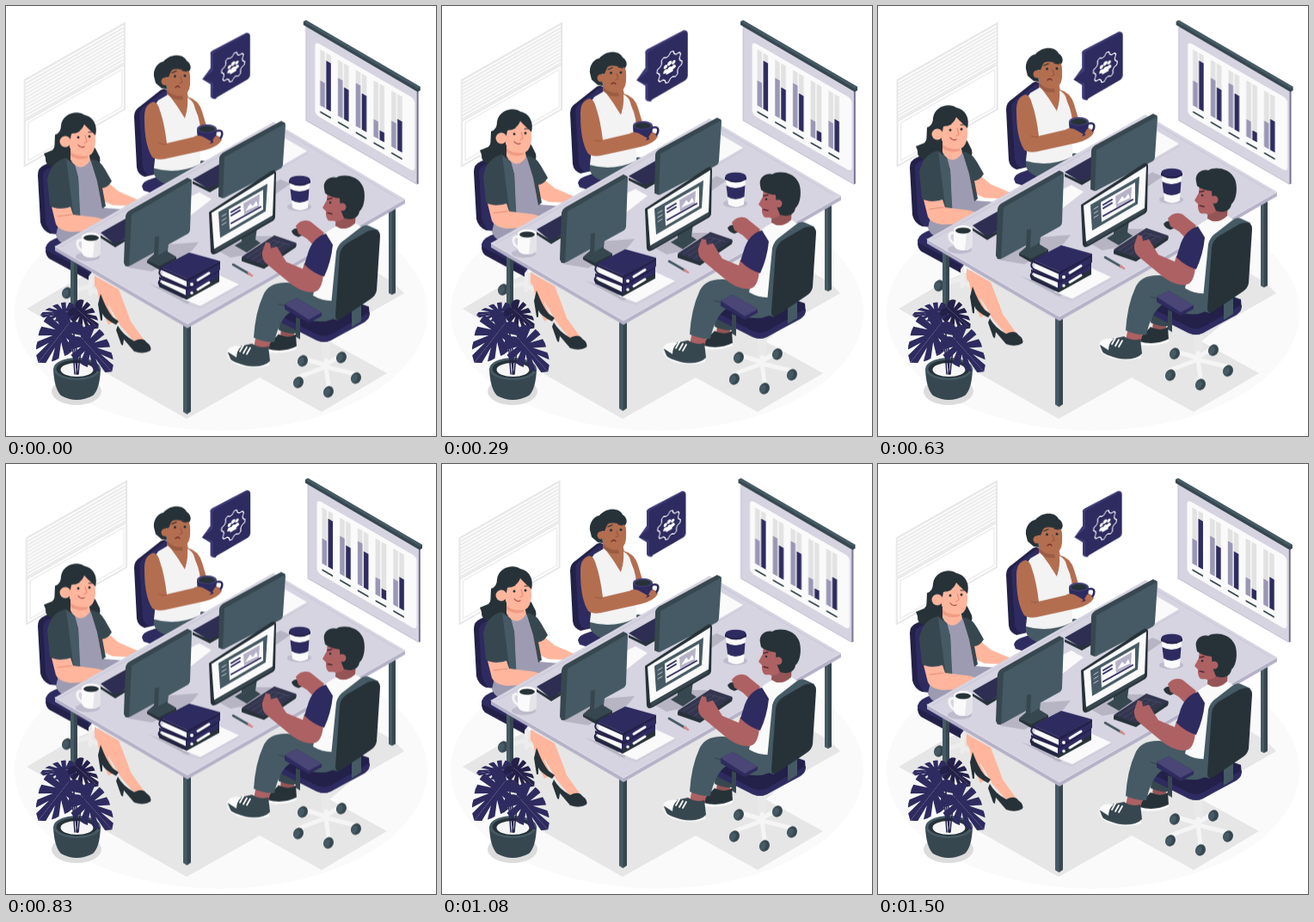
An HTML page that plays this animation: 500 px wide and 500 px high, repeating every 1.54 s.

```html
<!DOCTYPE html>
<html lang="en">
<head>
<meta charset="utf-8">
<title>Office</title>
<style>
html,body{margin:0;width:100%;height:100%;overflow:hidden;background:#fff}
svg{display:block;width:100vw;height:100vh}
.float,.shake,.beat{animation:1.54s linear infinite}
.float{animation-name:float}
.shake{animation-name:shake}
.beat{animation-name:beat;transform-origin:257px 71px}
@keyframes float{
  0%,100%{transform:translateY(-.4px)}
  46.6%{transform:translateY(-10px)}
  95.3%{transform:none}
}
@keyframes shake{
  0%,100%{transform:translateX(-.2px)}
  7.7%,85.6%{transform:translateX(-1px)}
  17.4%,75.8%{transform:translateX(2px)}
  27.1%,46.6%,66.1%{transform:translateX(-4px)}
  36.9%,56.4%{transform:translateX(4px)}
  95.3%{transform:none}
}
@keyframes beat{
  0%,100%{transform:scale(1.01)}
  17.4%,46.6%{transform:scale(1.1)}
  27.1%,36.9%,56.4%,95.3%{transform:none}
}
.navy{fill:#2e2b60}.deep{fill:#232049}.ink{fill:#263238}.slate{fill:#455a64}.dark{fill:#37474f}
.white{fill:#fafafa}.rose{fill:#ffb69d}.tan{fill:#b36e50}.brown{fill:#955455}.arm{fill:#ad6163}.lilac{fill:#d6d4e1}
.line{fill:none;stroke-linecap:round;stroke-linejoin:round}
</style>
</head>
<body>
<svg viewBox="0 0 500 500">
<defs>
  <pattern id="slats" width="10" height="4.1" patternUnits="userSpaceOnUse">
    <path d="M0 .6H10" stroke="#dedede" stroke-width="1"/>
  </pattern>
  <path id="half" d="M0 0C-6-9-22-9-26 2L-9 9-28 8Q-29 13-28 17L-9 16-26 23Q-25 29-22 33L-7 23-18 39Q-16 44-13 47L-5 32-8 52 0 57Z"/>
  <g id="leaf"><use href="#half"/><use href="#half" transform="scale(-1 1)"/></g>
  <g id="caster"><ellipse class="dark" rx="5.8" ry="6.800" transform="rotate(25)"/><ellipse class="slate" cx="-1.6" cy="1" rx="3.4" ry="5" transform="rotate(25)"/></g>
</defs>

<ellipse cx="250" cy="356" rx="240" ry="138" fill="#fafafa"/>
<path d="M24 352 78 320 290 230 450 321 463 334 400 370 376 390 443 427 367 472 295 432 210 480 110 423 62 374Z" fill="#e6e6e6"/>

<g class="shake">
  <g transform="translate(22 86) skewY(-29.6)">
    <path d="M0 0H116V100H0Z" fill="#fff" stroke="#e6e6e6" stroke-width="2"/>
    <path d="M4 52H113V96H4Z" fill="#fff" stroke="#ececec" stroke-width="1.4"/>
    <path d="M1 1H115V47H1Z" fill="#fafafa"/>
    <path d="M1 1H115V47H1Z" fill="url(#slats)"/>
    <path d="M1 48H115" stroke="#e0e0e0" stroke-width="1.4"/>
  </g>
</g>

<g class="shake">
  <path class="navy" d="M476 98 479.500 99V207L476 206Z"/>
  <g transform="translate(349 24) skewY(30)">
    <path class="lilac" d="M0 0H129V109H0Z" stroke="#b9b7cc" stroke-width=".8"/>
    <rect class="white" x="10.500" y="11" width="116" height="85" rx="5"/>
    <g id="bars"></g>
  </g>
  <path class="dark" d="M346 18 349 16.500 482 94V98L479 100 346 22Z"/>
  <path class="slate" d="M349 16.500 482 94 479 96 346 18.500Z"/>
</g>

<g class="beat">
  <path d="M238 57Q237 54 240 52L279 31.500Q282 31 283 33L244 108Q239 108 238 105V91L228.500 85 238 72Z" fill="#3d3a75"/>
  <path class="navy" d="M240.500 58Q240.500 55 243.500 53L280 33Q283.500 32 283.500 35V80Q283.500 83 281 85L245 106Q241 108 241 104V89L229 85 241 75Z"/>
  <g transform="translate(264 71) skewY(-30)">
    <path id="gear" class="line" stroke="#fff" stroke-width="1.1"/>
    <g fill="#fff" transform="scale(.9)"><circle cx="-4.800" cy="-3" r="2.200"/><circle cx="0" cy="-4.500" r="2.600"/><circle cx="4.800" cy="-3" r="2.200"/>
    <path d="M-7.500 4Q-7.500 0-4.500 0L-2.500 1Q0-2 2.500 1L4.500 0Q7.500 0 7.500 4L4 5V7H-4V5Z"/></g>
  </g>
</g>

<g class="float">
  <!-- colleague with cup -->
  <path class="deep" d="M149 129Q149 121 156 117L180 98Q186 95 191 102L200 180 174 196 161 199Q153 196 152 188Z"/>
  <path class="navy" d="M155 126Q156 120 162 116L184 99Q190 97 192 104L198 180 176 194 166 197Q160 194 159 187Z"/>
  <path class="navy" d="M158 210Q159 204 170 201L225 182 245 190 183 222 160 215Z"/>
  <path class="slate" d="M172 186Q200 190 228 180L238 182 190 209Q174 204 172 195Z"/>
  <path class="tan" d="M211 106Q224 109 228 123L234 143 223 146Z"/>
  <path class="tan" d="M187 90V104L196 124 208 132 213 112 210 98Z"/>
  <path d="M177 110 189 103Q199 116 208 131 212 119 211 107 218 110 220 120 227 135 226 152V184Q199 197 172 189 177 150 165 128Z" fill="#f3f3f3"/>
  <path class="tan" d="M171 112Q160 115 161 132 161 162 170 176 176 181 190 177L231 168Q247 164 251 156 247 149 238 151L221 152 187 160Q184 136 179 122 176 111 171 112Z"/>
  <path class="line" d="M186 161Q181 162 178 160" stroke="#985b42"/>
  <path fill="#9c5c43" d="M187 98Q194 106 205 105L206 109Q194 111 187 102Z"/>
  <path class="tan" d="M186 77Q197 69 211 70 215 78 214 92 213 104 203 105 192 104 187 94Z"/>
  <path class="ink" d="M172 82C171 73 177 66 183 65 190 56 206 55 210 64 215 67 216 73 213 76 204 75 196 71 192 76L189 83H186L187 97 181 96 174 90 172 82Z"/>
  <circle class="tan" cx="185" cy="88" r="4.500"/>
  <g class="line" stroke="#263238" stroke-width="1.300"><path d="M193 78 198 76M205 75 210 76"/><path d="M197 95Q200 92 202 95" stroke="#6e2f2c"/><path d="M203 83 205 89 202 90" stroke="#985b42"/></g>
  <circle class="ink" cx="196.500" cy="82" r="1.500"/><circle class="ink" cx="208" cy="81.500" r="1.500"/>
  <path class="line" d="M243 146Q253 143 251 151 249 157 242 155" stroke="#2e2b60" stroke-width="2.500"/>
  <path class="navy" d="M222 143H245Q245 158 239 160 231 162 226 159 222 155 222 143Z"/>
  <ellipse cx="233.500" cy="143" rx="11.500" ry="5" fill="#49457f"/><ellipse class="ink" cx="233.500" cy="143.500" rx="9.500" ry="3.700"/>
  <path class="tan" d="M219 152Q225 149 232 154L239 158 230 167 218 162ZM243 152Q248 151 250 157L245 161 240 157Z"/>

  <!-- colleague in waistcoat -->
  <path class="line" d="M98 313V335M98 326 74 333M98 330 122 340" stroke="#ededed" stroke-width="5"/>
  <use href="#caster" x="71" y="334"/>
  <path class="deep" d="M37 197Q37 188 45 185L64 177 72 267 51 265Q42 261 40 252Z"/>
  <path class="navy" d="M43 197Q44 190 52 188L66 185 70 264 54 265Q48 260 46 250Z"/>
  <path class="navy" d="M46 281Q48 273 62 269L110 258 130 270 96 315 50 292Q46 288 46 281Z"/>
  <path class="deep" d="M46 284 96 310V319L50 294Q46 290 46 284Z"/>
  <path class="rose" d="M103 314 131 330Q139 350 145 367L160 388 151 393 133 372Q118 344 103 326Z"/>
  <path class="rose" d="M104 320 121 326 119 350 127 366 119 371 110 350Z"/>
  <path class="ink" d="M110 335Q117 354 124 362L131 367 128 371Q114 364 112 358V366H110L107 347ZM130 372Q136 383 149 390 159 385 163 391 170 396 168 401 160 406 149 402L137 388 136 395 134 394 128 377Z"/>
  <path class="ink" d="M60 150Q58 164 54 168L44 172 46 177Q45 185 55 189L66 186 80 192 104 187Q111 184 109 176L104 166 98 160Z"/>
  <path fill="#9d9bb1" d="M70 182 102 180 117 206 113 235 138 237 90 280Q63 282 58 267L62 250Z"/>
  <path class="rose" d="M107 208 119 206 131 216 154 226 148 233 124 232 110 226Z"/>
  <path class="dark" d="M70 177Q52 181 48 202L51 233Q64 238 75 234L78 260 86 256 84 200 80 185Z"/>
  <path class="dark" d="M98 178Q109 179 115 190L123 204Q118 212 112 212L116 233 112 236 106 204Z"/>
  <path class="slate" d="M70 178 80 186 84 200 87 258 81 262 76 225Z"/>
  <path class="rose" d="M53 234Q65 238 75 234L78 243 103 246Q112 247 117 251L99 262 75 263Q61 261 58 254Z"/>
  <path class="line" d="M60 245 76 243" stroke="#e58e79"/>
  <path class="rose" d="M75 164V179Q86 196 98 180L95 164Z"/>
  <path d="M75 170Q84 177 95 174V177Q84 181 75 174Z" fill="#f29a83"/>
  <path class="rose" d="M74 143Q84 133 99 138 104 145 104 158 103 174 94 175 82 175 74 165Z"/>
  <path class="ink" d="M57 150Q64 148 64 139C66 125 83 121 91 127 102 129 107 140 104 151 101 147 95 143 91 138 88 146 82 148 76 149L74 160 72 172Q62 178 56 172Z"/>
  <circle class="rose" cx="69" cy="158" r="6.500"/>
  <g class="line" stroke="#263238" stroke-width="1.200"><path d="M80 148 85 146M96 147 100 147"/><path d="M92 151 94 158 91 160" stroke="#ef8d7b"/><path d="M84 162Q87 166 91 164" stroke="#ad3e48"/></g>
  <circle class="ink" cx="84" cy="153" r="1.500"/><circle class="ink" cx="97" cy="152" r="1.500"/>

  <!-- desk -->
  <g class="dark"><path d="M75 290H83V360H75ZM445 232H453V334L449 336 445 334ZM206 368H215V472L210.500 475 206 472Z"/></g>
  <path class="slate" d="M75 290H79V360H75ZM445 232H449V336L445 334ZM206 368H210.500V475L206 472Z"/>
  <path d="M57 280 311 136 464 226V230L211 375 57 285Z" fill="#b5b2c8"/>
  <path class="lilac" d="M57 280 311 135 464 225 211 370Z"/>
  <path class="line" d="M57 280 211 370 464 225" stroke="#e3e2ec"/>
  <path class="line" d="M64 280 311 139 456 224" stroke="#c5c2d5" stroke-width=".8"/>

  <!-- desk items -->
  <path fill="#aaa8b7" d="M140 304 184 278 224 275 216 285 170 309ZM243 283 277 268 309 268 291 287 261 293ZM288 221 319 202 331 207 309 222ZM166 323 211 347 250 321 243 318 209 340Z" opacity=".7"/>
  <path class="white" d="M202 228 225 217 239 225 212 246ZM295 175 319 151 350 169 302 197ZM205 341 247 313 271 324 226 349Z"/>
  <path class="line" d="M205 345 226 351 271 326M302 199 350 172" stroke="#c9c8d4"/>
  <path d="M110 264 142 246 160 256 127 278ZM217 202 254 181 273 191 237 214Z" fill="#2d2e52"/>
  <path class="ink" d="M110 267 127 277 155 261 155 264 127 281 110 270ZM217 204 237 213 256 202V206L237 217 217 207Z"/>

  <path class="slate" d="M250 179Q250 174 254 172L320 136Q325 134 325 139L322 184Q322 188 318 190L253 224 248 221Z"/>
  <path class="dark" d="M248 177Q249 173 252 171L320 134 325 137 254 176 252 224 247 222Z"/>

  <path class="dark" d="M174 267 190 258 188 286 198 292 178 304 164 296 172 289Z"/>
  <path class="ink" d="M164 296 178 303 198 292V295L178 307 164 299Z"/>
  <path class="slate" d="M143 246Q143 242 147 240L211 202Q216 200 216 205L214 260Q214 264 210 266L145 302Q140 304 140 299Z"/>
  <path class="dark" d="M139 245Q140 240 144 238L211 200 216 203 146 243 143 303 139 303 137 299Z"/>
  <path class="slate" d="M173 269 190 261 188 284 174 292Z"/><path class="dark" d="M173 269 178 268 177 291 172 294Z"/>

  <path class="dark" d="M274 266 292 258 290 272 296 276 280 287 266 279 274 274Z"/>
  <path class="ink" d="M236 240 309 192Q314 190 314 195L313 245Q313 249 309 251L245 288Q239 291 238 286Z"/>
  <path class="white" d="M239 241 312 195 310 244 242 283Z"/>
  <path class="dark" d="M242 283 310 244 310 248 244 287Z"/>
  <path class="slate" d="M247 240 304 207 302 239 249 270Z"/>
  <path class="white" d="M259 237 299 214 299 237 260 260Z"/>
  <path d="M276 230 295 219 294 234 277 243Z" fill="#b5b2c8"/>
  <path d="M278 239 284 230 287 233 291 227 293 232Z" fill="#fff"/>
  <path class="line" d="M262 240 272 234M262 244 272 238M262 253 296 234" stroke="#2e2b60" stroke-width="2"/>
  <path class="line" d="M251 245 256 242M251 250 256 247M251 255 256 252" stroke="#c7c5d4" stroke-width="1"/>

  <path class="ink" d="M274 293 311 269 338 277 337 281 300 306 274 297Z"/>
  <path d="M274 292 312 267 338 276 300 302Z" fill="#34364f"/>
  <path class="line" d="M280 293 311 273 329 278M286 295 318 274M293 298 324 277" stroke="#4d5069" stroke-width=".8"/>
  <path class="line" d="M264 301 283 312" stroke="#455a64" stroke-width="2.600"/><path class="line" d="M282 311 286 314" stroke="#d98a8a" stroke-width="2.600"/>

  <path class="ink" d="M178 321 210 336 248 314V321L210 342 178 327Z"/>
  <path class="white" d="M181 316 210 330V337L181 323Z"/>
  <path class="navy" d="M209 328 248 306V315L209 338Z"/>
  <path class="deep" d="M178 315 211 328 248 306V309L211 331 178 318Z"/>
  <path class="white" d="M182 308 211 320V327L182 314Z"/>
  <path class="navy" d="M210 318 249 297V307L210 329Z"/>
  <path class="line" d="M180 306Q176 311 181 315L210 328M179 319Q176 323 180 326L209 339" stroke="#232049" stroke-width="2"/>
  <path class="navy" d="M180 304 213 287 249 297 211 318Z"/>
  <path class="deep" d="M180 304 211 318 249 297V300L211 321 180 307Z"/>
  <path class="line" d="M223 319 236 311M223 330 236 322" stroke="#fff" stroke-width="3"/>
  <circle cx="216" cy="324" r="2" fill="#fff"/><circle cx="216" cy="334" r="1.800" fill="#fff"/>

  <ellipse cx="95" cy="292" rx="14" ry="5" fill="#bebbcd"/>
  <path class="line" d="M90 273Q82 271 83 278 85 286 92 285" stroke="#f5f5f5" stroke-width="3"/>
  <path class="white" d="M88 269H110V287Q108 293 99 293 90 293 88 287Z"/>
  <path d="M103 272 110 269V287Q108 293 101 293Z" fill="#e5e5e9"/>
  <ellipse cx="99" cy="269" rx="11" ry="5" fill="#fff"/><ellipse class="ink" cx="99" cy="270" rx="9" ry="3.500"/>

  <ellipse cx="341" cy="234" rx="14" ry="5" fill="#bebbcd"/>
  <path class="white" d="M330 206H353L351 235Q342 241 333 235Z"/>
  <path class="navy" d="M330.500 213Q341 219 352.500 213L351.500 226Q341 232 332 226Z"/>
  <path class="deep" d="M329 203H354V206Q342 213 329 206Z"/><ellipse class="navy" cx="341.500" cy="202.500" rx="12" ry="4.800"/>

  <!-- man in chair -->
  <g class="line" stroke="#f5f5f5" stroke-width="5"><path d="M372 388V420L340 432M372 418 348 411M372 417 391 406M372 420 405 428M372 420 375 442"/></g>
  <path d="M367 388H377V409Q372 412 367 409Z" fill="#e9e9e9"/>
  <use href="#caster" x="345" y="413"/><use href="#caster" x="390" y="409"/><use href="#caster" x="340" y="438"/><use href="#caster" x="407" y="433"/><use href="#caster" x="375" y="449"/>
  <path class="brown" d="M320 373 336 375 334 388 319 386Z"/>
  <path class="ink" d="M317 382Q329 388 337 382L338 397Q325 405 306 403L302 397Z"/>
  <path class="white" d="M304 399Q322 404 338 396V399Q322 406 304 403Z"/>
  <path class="dark" d="M319 345 352 355 338 381Q327 382 317 377Z"/>
  <path class="deep" d="M316 361Q315 356 323 352L374 333 422 350Q424 360 417 366L378 389Q370 393 361 389L321 368Q317 365 316 361Z"/>
  <path class="navy" d="M316 359 361 382Q370 386 378 382L423 356Q424 363 417 368L378 389Q370 393 361 389L321 369Q316 366 316 359Z"/>
  <path class="arm" d="M291 382 309 386 304 403 288 398Z"/>
  <path class="dark" d="M286 393Q296 399 305 396L307 413Q300 421 282 420L262 413 258 403 272 396Z"/>
  <path class="white" d="M274 396Q260 394 257 402 255 409 267 415 291 424 306 415V418Q290 424 270 418 254 411 257 402ZM274 396Q260 394 257 402L268 409Q268 401 274 396Z"/>
  <path class="line" d="M276 395 272 402M280 397 276 404M284 398 280 405" stroke="#fff" stroke-width="1.800"/>
  <path class="slate" d="M299 337Q305 321 328 322L386 338 394 354Q377 373 351 365L331 356Q318 364 312 391 301 392 288 386 290 356 299 337Z"/>
  <path class="line" d="M331 356Q326 348 317 347" stroke="#37474f" stroke-width="1.200"/>

  <path class="ink" d="M332 262Q337 256 345 261L347 266 340 269Q333 267 332 262Z"/>
  <path class="arm" d="M337 256Q344 247 354 251L370 264 361 282 350 271 340 265Z"/>
  <path class="white" d="M370 266Q385 252 405 252L420 262 390 342Q372 346 357 337L362 315Z"/>
  <path class="brown" d="M384 241 407 239 406 253Q394 264 383 256Z"/>
  <path class="arm" d="M374 215 392 216 394 246Q388 253 380 250 373 252 372 243L372 239 368 235 373 226Z"/>
  <path class="ink" d="M370 213C368 204 376 198 384 200 392 195 408 198 413 207 419 214 418 234 411 239 410 247 402 250 393 247L389 237 388 224Q377 223 371 218Z"/>
  <circle class="arm" cx="391" cy="234" r="4.500"/>
  <path class="line" d="M374 225 379 224M374 241 379 242" stroke="#4c2930" stroke-width="1.400"/><circle class="ink" cx="377" cy="229" r="1.300"/>
  <path class="arm" d="M347 299 369 311Q368 331 358 333 348 335 333 325L304 301Q297 296 298 286L302 275 307 276 308 282 315 280 321 290 326 298 345 306Z"/>
  <path class="navy" d="M372 265Q358 269 352 285L347 301Q357 311 370 315 378 298 380 278Z"/>

  <path class="slate" d="M402 342H413V367L402 374Z"/>
  <path class="dark" d="M337 362 342 364V388L337 385Z"/>
  <path class="navy" d="M324 347 338 340 367 357V361L352 369 324 353Z"/>
  <path d="M324 347 338 340 367 357 352 365Z" fill="#4a4776"/>
  <path class="slate" d="M377 359 384 286Q386 277 394 272L412 258Q417 254 422 256L433 261 386 366 379 364Z"/>
  <path class="ink" d="M383 360 388 290Q389 281 397 276L421 262Q435 257 435 268L431 331Q430 337 424 341L390 364Q383 368 383 360Z"/>
</g>

<!-- plant -->
<ellipse cx="82" cy="448" rx="29" ry="16" fill="#dcdcdc"/>
<path class="dark" d="M55 422H110Q109 446 101 453 82 463 64 453 56 445 55 422Z"/>
<ellipse class="slate" cx="82.500" cy="422" rx="27.500" ry="13"/>
<ellipse class="ink" cx="82.500" cy="422" rx="24" ry="10.500"/>
<ellipse cx="82.500" cy="423" rx="19" ry="8" fill="#f5f5f5"/>
<g class="line" stroke="#232049" stroke-width="1.500"><path d="M80 428Q78 395 73 359M83 428Q76 380 81 354M82 428Q85 395 75 370M84 428Q86 400 91 386"/></g>
<g class="navy">
  <use href="#leaf" transform="translate(76 355) rotate(83) scale(.4 .64)"/>
  <use href="#leaf" class="deep" transform="translate(81 351) rotate(-48) scale(.5 .62)"/>
  <use href="#leaf" transform="translate(74 368) rotate(38) scale(.88 1.040)"/>
  <use href="#leaf" transform="translate(87 385) rotate(-42) scale(.8 .95)"/>
</g>
</svg>
<script>
const get = id => document.getElementById(id);

const rect = (x, y, w, h, fill) => `<path d="M${x} ${y}h${w}v${h}h${-w}z" fill="${fill}"/>`;
const tops = [[53, 26], [38, 45], [32, 40], [62, 71], [52, 46]];
get('bars').innerHTML = tops.map(([a, b], i) => {
  const x = 16.5 + i * 20.7;
  return rect(x, 17, 5.5, 65, '#e2e2e2') + rect(x + 7, 17, 5.5, 65, '#e2e2e2')
    + rect(x, a, 5.5, 82 - a, '#9a97b5') + rect(x + 7, b, 5.5, 82 - b, '#2e2b60')
    + rect(x, 88.5, 12.5, 2, '#37474f');
}).join('');

// Eight teeth, four corners each
const teeth = Array.from({length: 32}, (_, i) => {
  const a = (i + .5) * Math.PI / 16, r = i % 4 < 2 ? 13.5 : 11;
  return (r * Math.cos(a)).toFixed(2) + ' ' + (r * 1.15 * Math.sin(a)).toFixed(2);
});
get('gear').setAttribute('d', 'M' + teeth.join('L') + 'Z');
</script>
</body>
</html>
```
